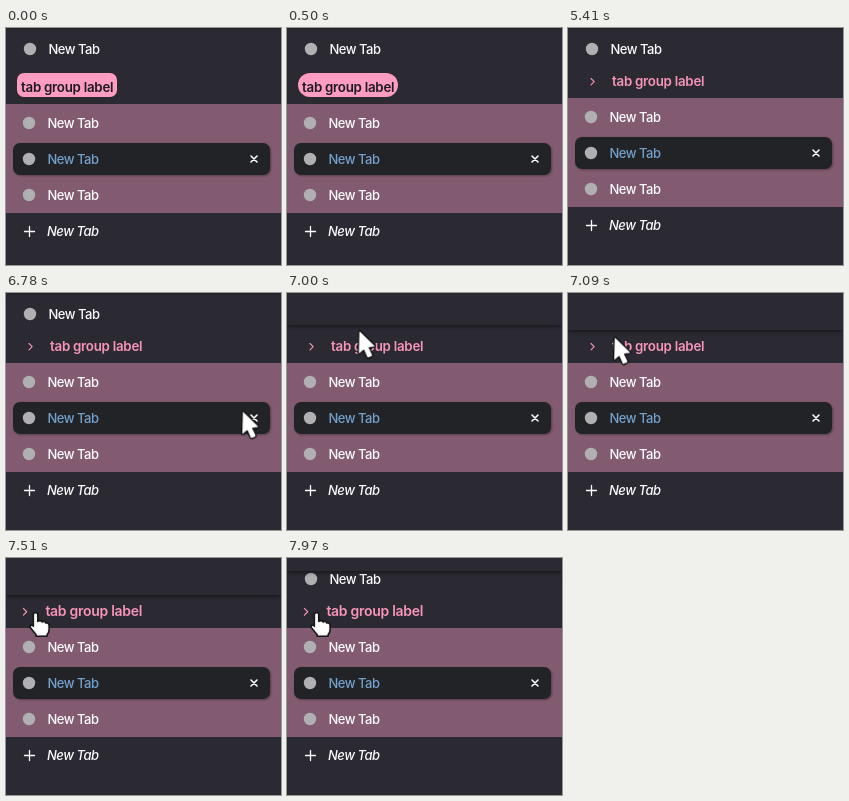
An HTML page for the animation above (8 s loop, 275 by 237 pixels).

```html
<!DOCTYPE html>
<html lang="en">
<head>
<meta charset="utf-8">
<title>Tab group styles</title>
<style>
  html, body { margin: 0; width: 100%; height: 100%; overflow: hidden; background: #2b2a33; }
  svg { display: block; width: 100%; height: 100%; }
  text { font: 500 13px Inter, sans-serif; letter-spacing: -.5px; }
  .label { font-weight: 600; font-size: 13.3px; letter-spacing: -.25px; }
  .new { font-style: italic; }
  .ink { fill: #1b1a21; }
  .pink { fill: #ff9cc1; }
  .rose { fill: #f794b9; }
  .line { fill: none; stroke-linecap: round; stroke-linejoin: round; }
  .active { filter: drop-shadow(1px 1px 1px rgba(0, 0, 0, .35)); }
  .bar { filter: drop-shadow(0 1px 2px rgba(0, 0, 0, .6)); }

  .square, .pill, .flat, .plain, .list, .bar, .row, .pointer, .arrow, .hand {
    animation: 8s linear infinite;
  }
  .square, .pill, .flat, .plain, .list, .arrow, .hand { animation-timing-function: step-end; }
  .square { animation-name: square; }
  .pill { animation-name: pill; }
  .flat { animation-name: flat; }
  .plain { animation-name: plain; }
  .list { animation-name: list; }
  .bar { animation-name: bar; }
  .row { animation-name: row; transform-origin: 136px 53px; }
  .pointer { animation-name: pointer; }
  .arrow { animation-name: arrow; }
  .hand { animation-name: hand; }

  @keyframes square { 0% { visibility: visible } 6.25%, 100% { visibility: hidden } }
  @keyframes pill { 0%, 34.625%, 100% { visibility: hidden } 6.25% { visibility: visible } }
  @keyframes flat { 0%, 67.625%, 100% { visibility: hidden } 34.625% { visibility: visible } }
  @keyframes plain { 0% { visibility: hidden } 67.625%, 100% { visibility: visible } }
  @keyframes list {
    0% { transform: none }
    34.625% { transform: translateY(-21px) }
    67.625%, 100% { transform: translateY(-6px) }
  }
  @keyframes bar {
    0%, 85.5% { transform: translateY(-2px) }
    87.5% { transform: translateY(32px) }
    88.4%, 98.125% { transform: translateY(37px) }
    99.625%, 100% { transform: translateY(13px) }
  }
  @keyframes row {
    0%, 92% { transform: none; animation-timing-function: ease-out }
    93.875%, 100% { transform: scale(1.05) }
  }
  @keyframes pointer {
    0%, 84.1% { transform: translate(280px, 139px) }
    85.8% { transform: translate(165px, 84px) }
    87.5% { transform: translate(71px, 37px); animation-timing-function: ease-out }
    89.625%, 91.7% { transform: translate(35px, 46px) }
    91.75% { transform: translate(34px, 46px) }
    93.875%, 100% { transform: translate(29.5px, 54px) }
  }
  @keyframes arrow { 0%, 92.6%, 100% { visibility: hidden } 84.125% { visibility: visible } }
  @keyframes hand { 0% { visibility: hidden } 92.6%, 100% { visibility: visible } }
</style>
</head>
<body>
<svg viewBox="0 0 275 237">
  <defs>
    <g id="tab">
      <circle cx="23" cy="0" r="6.2" fill="#b0b0b2"/>
      <text x="41.5" y="5">New Tab</text>
    </g>
  </defs>
  <rect width="275" height="237" fill="#2b2a33"/>
  <use href="#tab" x="1" y="21" fill="#fbfbfe"/>

  <g class="square">
    <rect class="pink" x="11" y="45" width="100" height="24" rx="7"/>
    <text class="label ink" x="15" y="64">tab group label</text>
  </g>
  <g class="pill">
    <rect class="pink" x="11" y="45" width="100" height="24" rx="12"/>
    <text class="label ink" x="15" y="64">tab group label</text>
  </g>
  <g class="flat">
    <rect class="pink" x="11" y="43" width="116" height="10" rx="5"/>
    <text class="label ink" x="23" y="52">tab group label</text>
  </g>
  <g class="plain">
    <g class="row">
      <path class="line" d="M23 50.500l3.200 3.200-3.200 3.200" stroke="#f794b9" stroke-width="1.1"/>
      <text class="label rose" x="44" y="58">tab group label</text>
    </g>
  </g>

  <g class="list" fill="#fbfbfe">
    <rect y="76" width="275" height="109" fill="#835b70"/>
    <use href="#tab" y="95"/>
    <rect class="active" x="7" y="115" width="257" height="32" rx="7" fill="#212327"/>
    <use href="#tab" y="131" fill="#74a1cc"/>
    <path class="line" d="M245 128l6 6m0-6l-6 6" stroke="#fbfbfe" stroke-width="1.6"/>
    <use href="#tab" y="167"/>
    <path class="line" d="M18.500 203.500h10m-5-5v10" stroke="#fbfbfe" stroke-width="1.3"/>
    <text class="new" x="41" y="208">New Tab</text>
  </g>

  <rect class="bar" y="-40" width="275" height="40" fill="#2b2a33"/>

  <g class="pointer" fill="#fff" stroke="#111" stroke-width="1.4" stroke-linejoin="round">
    <path class="arrow" d="M1 2Q1-.5 3 1.2L17 15Q18.600 17 16 17.300L11.700 17.800L15 24.500Q15.300 26 14 26.700L11 28Q9.700 28.300 9 27L6 20.300L2.500 23.300Q.5 24.500 .5 22Z"/>
    <path class="hand" transform="scale(1.1)" d="M-2 13V2.500Q-2 .5 0 .5T2 2.500V8.500Q4.500 6.800 6 9Q8.300 7.800 9.300 10Q12.300 9.500 12.300 12.500V16Q12.300 18.500 10.500 20.500V22H.5V20.500L-4.500 14.500Q-5.500 12.500-4 11.700Q-3 11.500-2 13Z"/>
  </g>
</svg>
</body>
</html>
```
